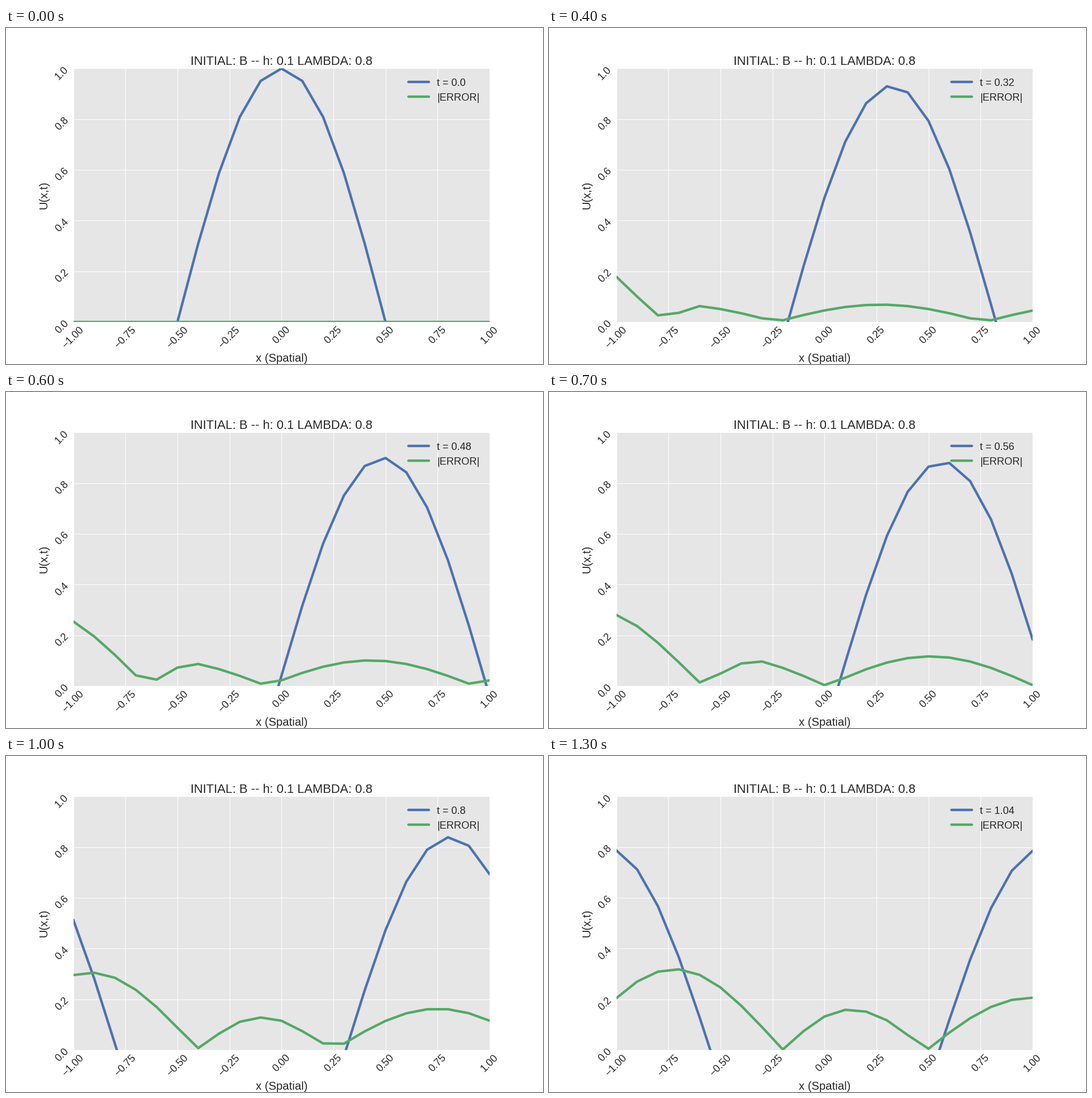
Animation, 946 px wide and 592 px high, one loop 1400 ms. Source, as a matplotlib script:

```python
import matplotlib.pyplot as plt
import numpy as np
from matplotlib.animation import FuncAnimation

WIDTH, HEIGHT, DPI = 946, 592, 100
LEFT, RIGHT, TOP, BOTTOM = 118.6, 851.9, 71.4, 518
STEPS = 14
H, LAMBDA = 0.1, 0.8
BLUE, GREEN = "#4C72B0", "#55A868"
INK, PANEL = "#262626", "#E6E6E6"
SMALL, MEDIUM, LARGE = 13.1, 14.6, 15.78

plt.rcParams.update({
    "font.family": "Liberation Sans",
    "text.color": INK,
    "axes.labelcolor": INK,
    "axes.labelsize": MEDIUM,
    "lines.linewidth": 3.15,
    "lines.solid_capstyle": "round",
})

x = np.linspace(-1, 1, 21)


def exact(t):
    return np.cos(np.pi * (x - t))


def solve():
    """Lax-Friedrichs steps for u_t + u_x = 0, wrapped at the ends."""
    states = [exact(0)]
    for _ in range(STEPS - 1):
        u = states[-1]
        states.append((1 + LAMBDA) / 2 * np.roll(u, 1)
                      + (1 - LAMBDA) / 2 * np.roll(u, -1))
    return states


states = solve()

fig = plt.figure(figsize=(WIDTH / DPI, HEIGHT / DPI), dpi=DPI, facecolor="white")
ax = fig.add_axes([LEFT / WIDTH, 1 - BOTTOM / HEIGHT,
                   (RIGHT - LEFT) / WIDTH, (BOTTOM - TOP) / HEIGHT],
                  facecolor=PANEL)
ax.set(xlim=(-1, 1), ylim=(0, 1),
       xticks=np.linspace(-1, 1, 9), yticks=np.linspace(0, 1, 6))
ax.spines[:].set_visible(False)
ax.set_axisbelow(True)
ax.grid(color="white", linewidth=0.75)
ax.tick_params(length=0, pad=3.6, labelsize=SMALL, labelcolor=INK, labelrotation=45)
ax.set_title(f"INITIAL: B -- h: {H} LAMBDA: {LAMBDA}", fontsize=LARGE, pad=4.5)
ax.set_xlabel("x (Spatial)", labelpad=3.7)
ax.set_ylabel("U(x,t)", labelpad=4.9)

wave, = ax.plot(x, states[0], color=BLUE, label="t = 0.0")
error, = ax.plot(x, 0 * x, color=GREEN, label="|ERROR|")
legend = ax.legend(loc="upper right", frameon=False, fontsize=SMALL,
                   borderaxespad=0.55)
time_label = legend.get_texts()[0]


def update(step):
    t = round(step * LAMBDA * H, 2)
    wave.set_ydata(states[step])
    error.set_ydata(np.abs(exact(t) - states[step]))
    time_label.set_text(f"t = {t}")
    return wave, error, time_label


anim = FuncAnimation(fig, update, frames=STEPS, interval=100, repeat=True)
plt.show()
```
